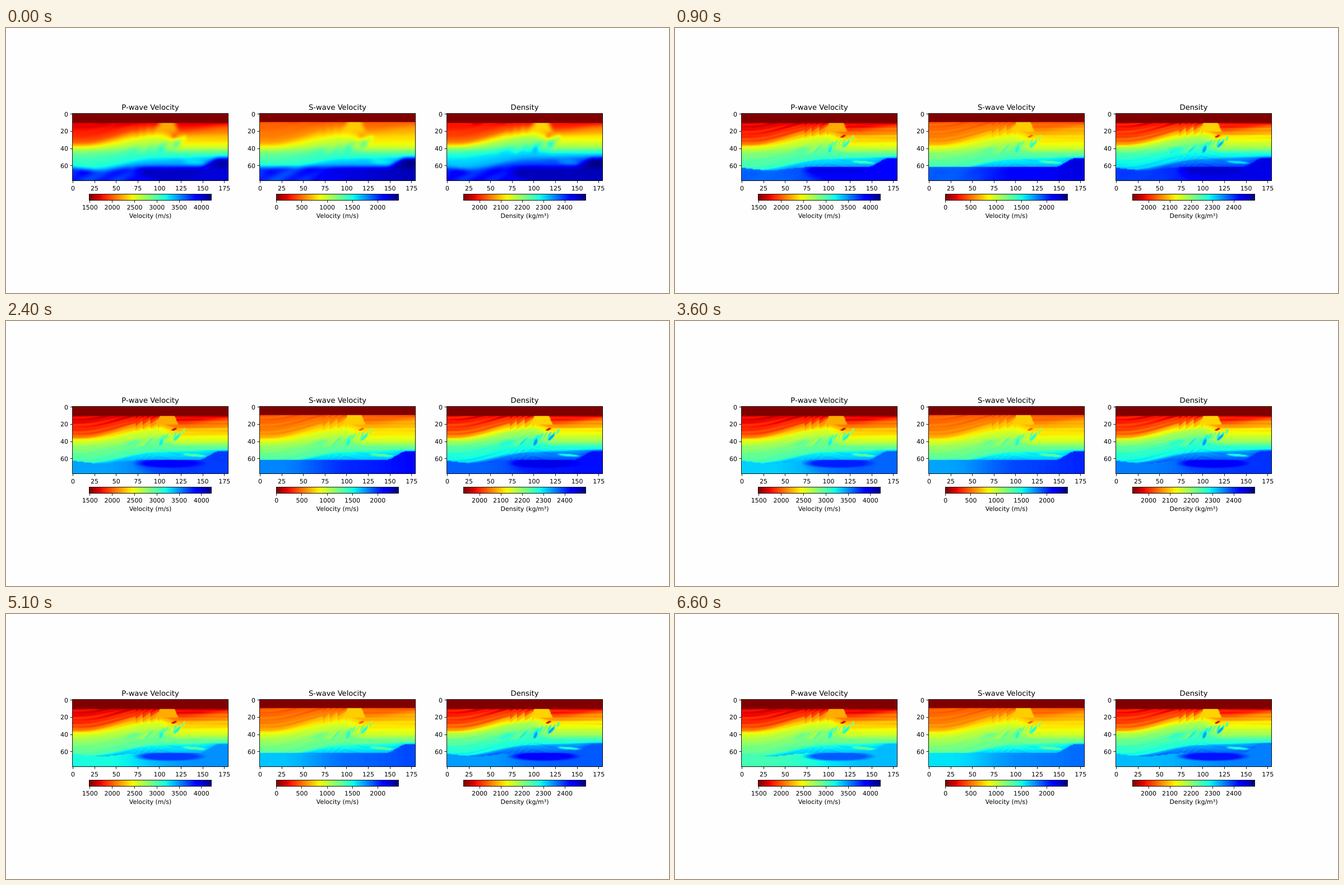
These frames come from a looping animation (1183x473 px, 6700 ms). An HTML page with a canvas:

```html
<!DOCTYPE html>
<html lang="en">
<head>
<meta charset="utf-8">
<title>Velocity and density models</title>
<style>
  html, body { margin: 0; width: 100%; height: 100%; overflow: hidden; background: #fefefe; }
  canvas, svg { position: absolute; left: 0; top: 0; }
  text { font: 11px "DejaVu Sans", sans-serif; text-anchor: middle; text-rendering: geometricPrecision; }
  .title { font-size: 13.1px; }
  .end { text-anchor: end; }
  path, rect { fill: none; stroke: #000; stroke-width: .9; }
</style>
</head>
<body>
<canvas id="view" width="1183" height="473"></canvas>
<svg id="axes" width="1183" height="473"></svg>
<script>
const W = 180, H = 78, TOP = 152.5, PW = 278, PH = 120, LOOP = 6700;
const ctx = document.getElementById('view').getContext('2d');
const axes = document.getElementById('axes');
const clamp = v => Math.max(0, Math.min(1, v));
const mix = (a, b, k) => a + (b - a) * k;
const smooth = k => (k = clamp(k), k * k * (3 - 2 * k));
const bell = (x, mid, width) => Math.exp(-(((x - mid) / width) ** 2));

// bar: first tick position, tick gap, first value, step, count
// deep: values at the left, in the core and at the right, at the start and end of the loop
const panels = [
  { title: 'P-wave Velocity', label: 'Velocity (m/s)', x: 118.5, sea: 11, sag: 4,
    bar: [149.8, 39.8, 1500, 500, 6], tone: v => v,
    deep: [[.83, .94, .92], [.57, .79, .69]] },
  { title: 'S-wave Velocity', label: 'Velocity (m/s)', x: 452.5, sea: 10, sag: 0,
    bar: [482.8, 45.1, 0, 500, 5], tone: v => v < .37 ? .14 + .62 * v : .37 + .95 * (v - .37),
    deep: [[.82, .92, .95], [.65, .74, .77]] },
  { title: 'Density', label: 'Density (kg/m³)', x: 786.5, sea: 11, sag: 4,
    bar: [845, 38, 2000, 100, 5], tone: v => .01 + 1.12 * v,
    deep: [[.85, .95, .95], [.69, .86, .75]] }
];

// layer limits: value, depth at the left, rise to the crest, drop and tilt behind it
const layers = [
  [.16, 31, 18, 7, 7], [.27, 36.5, 17, 5, 0], [.37, 39, 13, 11, 0],
  [.44, 46, 12, 9, 0], [.5, 54, 11, 3, 0], [.55, 65, 13, -1, 2], [.62, 66, 13, -1, 2]
];

let seed = 7;
const random = () => (seed = seed * 16807 % 2147483647) / 2147483647;

// slivers: x, depth, half length, half width, angle, value
const slivers = [
  [102, 41, 5, 2.2, -65, .63], [120, 35.5, 6, 2, -45, .63],
  [117, 26, 4, 1.3, -25, .05], [140, 56, 15, 1.8, 5, .53]
];
for (let x = 58; x < 130; x += 5) {
  slivers.unshift([x, mix(43, 31, (x - 58) / 60) + 6 * random() - 1, mix(10, 4, (x - 58) / 72),
    1.2 + random() * .5, mix(-25, -55, (x - 58) / 50), mix(.42, .57, random())]);
}

function sliverMask(x, z, [cx, cz, len, wid, deg]) {
  const a = deg * Math.PI / 180, dx = x - cx, dz = z - cz;
  const along = (dx * Math.cos(a) + dz * Math.sin(a)) / len;
  const across = (dz * Math.cos(a) - dx * Math.sin(a)) / wid;
  return clamp((1 - Math.hypot(along, across)) * 3);
}

// limits of the layers in one column, as [depth, value]
function column(x, floor) {
  const rise = smooth((x - 10) / 90), fall = smooth((x - 98) / 25), tilt = smooth((x - 125) / 60);
  const tooth = x > 72 && x < 100 ? 3.5 - 5 * ((x - 72) / 9 % 1) : 0;
  const limits = layers.map(([v, z, up, down, lean], i) =>
    [Math.min(floor, z - up * rise + down * fall - lean * tilt + (i < 2 ? tooth : 0)), v]);
  return [[11, .075], ...limits, [floor, .69]];
}

function shallow(x, z, limits, lift) {
  let i = 0;
  while (i < limits.length - 2 && z > limits[i + 1][0]) i++;
  const [z0, v0] = limits[i], [z1, v1] = limits[i + 1];
  let v = mix(v0, v1, clamp((z - z0) / Math.max(.5, z1 - z0)));
  const q = z - limits[2][0];
  v += (v < .3 ? .016 : .008) * (Math.sin(q * 1.5) + Math.sin(q * .73 + x * .04));
  if (z < 21 && x > 100 - (z - 11) * .5 && x < 118 + (z - 11) * .4) v = Math.max(v, .27);
  for (const s of slivers) v = mix(v, s[5], sliverMask(x, z, s));
  return v + 2 * lift * (1 - v) * smooth((z - 36) / 12);
}

function deep(p, late, x, z) {
  const [left, core, right] = p.deep[late];
  if (!p.sag) return x < 110 ? mix(left, core, smooth((x - 20) / 90)) : mix(core, right, clamp((x - 110) / 60));
  const d = Math.hypot((x - 112) / 44, (z - 65.5) / (late ? 6 : 16));
  return mix(mix(left, right, smooth((x - 30) / 120)), core, clamp((1 - d) * 3));
}

function blur(field, radius, sea) {
  for (let pass = 0; pass < 4; pass++) {
    const src = field.slice(), across = pass % 2;
    for (let z = sea; z < H; z++) for (let x = 0; x < W; x++) {
      let sum = 0;
      for (let d = -radius; d <= radius; d++) {
        const sx = across ? Math.max(0, Math.min(W - 1, x + d)) : x;
        const sz = across ? z : Math.max(sea, Math.min(H - 1, z + d));
        sum += src[sz * W + sx];
      }
      field[z * W + x] = sum / (2 * radius + 1);
    }
  }
}

function makeField(p, late, rough) {
  const field = new Float32Array(W * H), lift = rough ? .08 : late ? 0 : .045;
  for (let x = 0; x < W; x++) {
    const floor = 61.5 + p.sag * bell(x, 32, 28) - 10 * smooth((x - 145) / 25);
    const limits = column(x, floor);
    for (let z = p.sea; z < H; z++) {
      let v = z < floor ? p.tone(shallow(x, z, limits, lift)) : deep(p, late, x, z);
      if (rough && z >= floor) v += .03 * Math.sin(x * .18 + z * .35) * clamp((110 - x) / 60)
        + .05 * bell(x, 8, 10) * bell(z, 66, 4) + .06 * bell(x, 172, 12) * bell(z, 57, 5);
      field[z * W + x] = v;
    }
  }
  if (rough) blur(field, 2, p.sea);
  return field;
}

// reversed jet colours
const ramp = (u, a, b, c, d, lo, hi) => 255 * (
  u < a ? lo : u < b ? mix(lo, 1, (u - a) / (b - a)) :
  u < c ? 1 : u < d ? mix(1, hi, (u - c) / (d - c)) : hi);
const colors = Array.from({ length: 256 }, (_, i) => {
  const u = 1 - i / 255;
  return [ramp(u, .35, .66, .89, 1, 0, .5), ramp(u, .125, .375, .64, .91, 0, 0), ramp(u, 0, .11, .34, .65, .5, 0)];
});

let marks = '';
const snap = v => Math.floor(v) + .5;
const text = (x, y, s, cls = '') => marks += `<text x="${x}" y="${y}" class="${cls}">${s}</text>`;
const line = d => marks += `<path d="${d}"/>`;
const box = (x, y, w, h) => marks += `<rect x="${x}" y="${y}" width="${w}" height="${h}"/>`;

function drawAxes({ x, title, label, bar }) {
  const bx = x + 30, bw = 218;
  for (let i = 0; i < bw; i++) {
    ctx.fillStyle = `rgb(${colors[Math.floor(i / bw * 256)]})`;
    ctx.fillRect(Math.floor(bx) + i, 297, 1, 11);
  }
  box(x, TOP, PW, PH);
  box(bx, 296.5, bw, 11);
  text(x + PW / 2, 146, title, 'title');
  text(x + PW / 2, 339, label);
  for (let n = 0; n < W; n += 25) {
    const tx = x + .2 + (n + .5) * PW / W;
    line(`M${snap(tx)} 273v3.8`);
    text(tx, 289.5, n);
  }
  for (let n = 0; n < H; n += 20) {
    const ty = TOP + .4 + (n + .5) * PH / H;
    line(`M${x} ${snap(ty)}h-4`);
    text(x - 7.5, ty + 4, n, 'end');
  }
  const [start, gap, first, step, count] = bar;
  for (let i = 0; i < count; i++) {
    const tx = start + i * gap;
    line(`M${snap(tx)} 308v3.8`);
    text(tx, 324.3, first + i * step);
  }
}

ctx.fillStyle = '#fefefe';
ctx.fillRect(0, 0, 1183, 473);
for (const p of panels) {
  p.rough = makeField(p, 0, true);
  p.early = makeField(p, 0, false);
  p.late = makeField(p, 1, false);
  p.canvas = document.createElement('canvas');
  p.canvas.width = W;
  p.canvas.height = H;
  p.ctx = p.canvas.getContext('2d');
  p.image = p.ctx.createImageData(W, H);
  p.image.data.fill(255);
  drawAxes(p);
}
axes.innerHTML = marks;

function paint(t) {
  const haze = Math.exp(-t / 450), age = (t / (LOOP - 100)) ** .8;
  for (const { rough, early, late, image, canvas, ctx: small, x } of panels) {
    for (let i = 0; i < W * H; i++) {
      const v = mix(early[i], late[i], age) + (rough[i] - early[i]) * haze;
      image.data.set(colors[Math.round(255 * clamp(v))], 4 * i);
    }
    small.putImageData(image, 0, 0);
    ctx.drawImage(canvas, x, TOP, PW, PH);
  }
}

let shown = -1;
function tick() {
  const t = Math.floor(performance.now() % LOOP / 100) * 100;
  if (t !== shown) paint(shown = t);
  requestAnimationFrame(tick);
}
tick();
</script>
</body>
</html>
```
